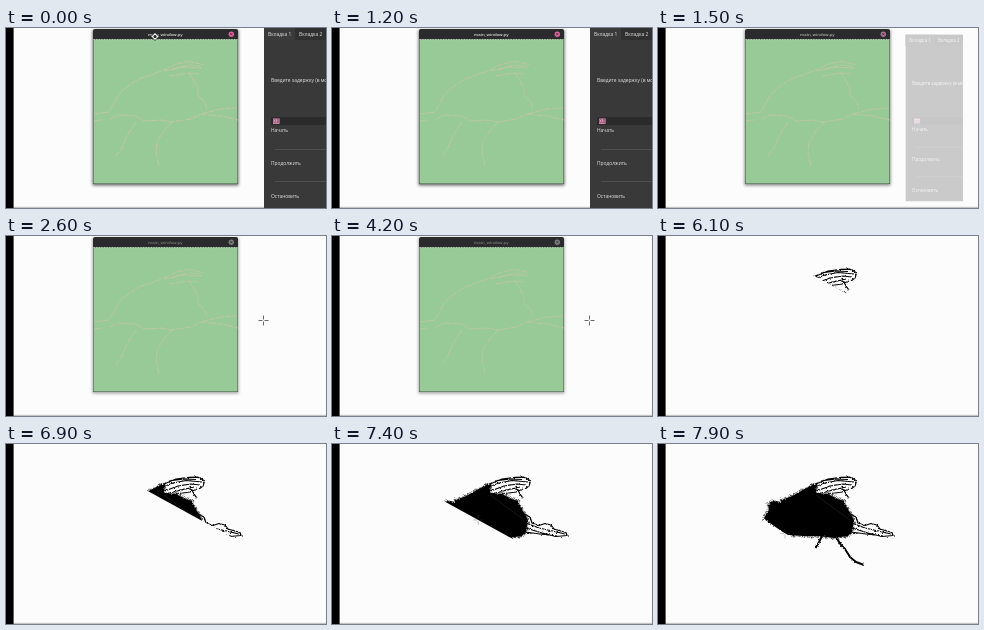
Recreate the animation shown at these times as an HTML page. Size 320 px wide and 180 px high, loop 8 s.

```html
<!DOCTYPE html>
<html lang="ru">
<head>
<meta charset="utf-8">
<title>Drawing a fly</title>
<style>
  html, body { margin: 0; width: 100%; height: 100%; overflow: hidden; background: #fcfcfc; }
  svg { display: block; width: 100vw; height: 100vh; }
  text { font: 4.9px "Open Sans", "Noto Sans", sans-serif; fill: #e4e4e4; }
  .title { font-size: 4.3px; font-weight: 600; text-anchor: middle; }
  .edges { fill: none; stroke: #d9c3a2; stroke-width: .65; stroke-dasharray: 5 1 2 .8 7 1.4; }
  .veins, .legs { fill: none; stroke: #000; stroke-linejoin: round; }
  .veins { stroke-width: 1.25; }
  .legs { stroke-width: 2; }
</style>
</head>
<body>
<svg viewBox="0 0 320 180" preserveAspectRatio="none">
  <defs>
    <filter id="shadow" x="-10%" y="-10%" width="120%" height="120%">
      <feGaussianBlur stdDeviation="1.6"/>
    </filter>
    <filter id="rough" x="-5%" y="-5%" width="110%" height="110%">
      <feTurbulence type="fractalNoise" baseFrequency=".45" numOctaves="2" seed="4"/>
      <feDisplacementMap in="SourceGraphic" scale="2.6" xChannelSelector="R" yChannelSelector="G"/>
    </filter>
    <clipPath id="drawn"><polygon id="front"/></clipPath>
  </defs>

  <rect width="320" height="180" fill="#fcfcfc"/>
  <rect y="178.8" width="320" height="1.2" fill="#c4c4c4"/>
  <rect width="7.6" height="180" fill="#000"/>

  <g id="fly" clip-path="url(#drawn)">
    <g filter="url(#rough)">
      <path id="body" d="M106 75L108 70 111 66 110 61 115 57 122 58 126 55 134 52 143 47 150 44 155 41 159 39 158 49 170 50 178 54 186 57 189 64 193 70 196 76 194 88 190 92 176 94 160 92 145 92 129 91Z"/>
      <path id="hairs" stroke="#000" stroke-width=".7"/>
      <path class="veins" d="M144 47L158 40 170 35 183 33.4 192 33.2 198.5 36.8 197 42 193 45M152 45L167 39 180 36.5 196 38M156 48L172 42 185 40 194 41M160 50L175 46 188 43M170 50L184 48 191 45M184 42L188 50 191 54M163 37L178 35 190 35.5"/>
      <path class="veins" d="M190 69L198 73 200 79 207 81.5 213 79.5 219 81 222 85 234 88.5 235 91.5 224 92.5 210 89 194 84M194 79L207 84 220 87 233 90M193 88L208 90 225 92"/>
      <path class="legs" d="M164 92L161 98 157.5 104M178 93L183 101 187 105 192 113 198 118 206 121"/>
    </g>
    <path d="M158 51L192 76" stroke="#444" stroke-width=".35"/>
  </g>

  <g id="panel">
    <rect x="258" width="62" height="180" fill="#393939"/>
    <rect x="258" width="62" height="12" fill="#303030"/>
    <rect x="258" width="31" height="12" fill="#3b3b3b"/>
    <rect x="265" y="89" width="55" height="8" fill="#2b2b2b"/>
    <rect x="267" y="90.5" width="6.6" height="5.4" fill="#e08bb6"/>
    <path d="M269 121.5H320M269 153.5H320" stroke="#555" stroke-width=".8"/>
    <text x="262" y="8">Вкладка 1</text>
    <text x="293" y="8">Вкладка 2</text>
    <text x="265" y="54">Введите задержку (в мс)</text>
    <text x="267.2" y="95" style="font-size:4.4px;fill:#333">0.0</text>
    <text x="265" y="104">Начать</text>
    <text x="265" y="137">Продолжить</text>
    <text x="265" y="170">Остановить</text>
  </g>

  <g id="window">
    <rect id="shade" x="86.5" y="2" width="146" height="155.5" fill="#000" filter="url(#shadow)"/>
    <path d="M87 156V3Q87 1 89 1H230Q232 1 232 3V156Z" fill="#2b2b2d"/>
    <rect x="87.4" y="11.4" width="144.2" height="144.2" fill="#98ca98"/>
    <path d="M87.5 11.6H231.5" stroke="#d8e8d4" stroke-width=".8" stroke-dasharray="1.4 1.2"/>
    <text id="title" class="title" x="159.3" y="7.7">main_window.py</text>
    <circle id="close" cx="225.3" cy="6.2" r="2.7"/>
    <path d="M224.2 5.1L226.4 7.3M226.4 5.1L224.2 7.3" stroke="#2b2b2d" stroke-width=".7"/>
    <g id="edges" class="edges">
      <path d="M88 86L103 84 108 75 113 66 122 58 133 51 147 46 158 42 170 36 183 33.5 197 36.5M159 43L175 39 196 40M164 48L182 45 192 46M166 42L182 37 194 38M183 45L187 51 192 60 192 68 199 74 201 81"/>
      <path d="M88 93L96 92M104 91L112 87 130 88 138 93 155 92 165 94 185 91 195 86 215 81 231 80M195 86L215 88 232 92"/>
      <path d="M130 94L121 108 116 120 110 128M166 94L157 104 151 114 150 125 153 138"/>
    </g>
  </g>

  <g id="pointer">
    <path d="M0 -4L4 0 0 4 -4 0Z" fill="#fff" stroke="#111" stroke-width=".8"/>
    <circle r="1.6" fill="#222"/>
  </g>
  <path id="cross" d="M-5 0H-1M1 0H5M0 -5V-1M0 1V5" stroke="#444" stroke-width=".8"/>
</svg>
<script>
const $ = id => document.getElementById(id);
const LOOP = 8000, STEP = 100, SLOPE = .55;

// Linear track through [time, value] pairs
function track(t, ...keys) {
  if (t <= keys[0][0]) return keys[0][1];
  for (let i = 1; i < keys.length; i++) {
    const [a, from] = keys[i - 1], [b, to] = keys[i];
    if (t <= b) return from + (to - from) * (t - a) / (b - a);
  }
  return keys[keys.length - 1][1];
}

const show = (id, on) => $(id).setAttribute('visibility', on ? 'visible' : 'hidden');
const fade = (id, value) => $(id).setAttribute('opacity', value);
const place = (id, x, y) => $(id).setAttribute('transform', `translate(${x} ${y})`);
const mix = (a, b, k) => `rgb(${a.map((v, i) => Math.round(v + (b[i] - v) * k))})`;

function growHairs() {
  let seed = 7, d = '';
  const random = () => (seed = seed * 16807 % 2147483647) / 2147483647;
  const body = $('body'), length = body.getTotalLength();
  for (let s = 0; s < length * .86; s += 1.6) {
    const p = body.getPointAtLength(s);
    const angle = Math.atan2(p.y - 70, p.x - 152) + random() - .5;
    const reach = .8 + random() * 1.8;
    d += `M${p.x} ${p.y}l${Math.cos(angle) * reach} ${Math.sin(angle) * reach}`;
  }
  $('hairs').setAttribute('d', d);
}

function draw(t) {
  const blur = track(t, [1300, 0], [1700, 1]);
  show('window', t < 5200);
  $('title').style.fill = mix([228, 228, 228], [125, 125, 125], blur);
  $('close').setAttribute('fill', mix([224, 100, 160], [125, 125, 125], blur));
  fade('shade', .6 - .25 * blur);
  fade('edges', t < 400 ? 1 : t < 4200 ? .88 : .8);

  const gone = track(t, [1200, 0], [1600, 1]);
  fade('panel', 1 - gone);
  $('panel').setAttribute('transform', `translate(${gone * 12} ${gone * 9}) scale(${1 - gone * .1})`);

  show('pointer', t < 800);
  place('pointer', track(t, [0, 149], [300, 73], [800, 280]), track(t, [0, 8.5], [300, 50], [800, 104]));

  // The fly appears behind a slanted front moving down and left
  const front = track(t, [5200, -71.6], [5700, -55], [5900, -52], [6200, -43], [6400, -42],
    [6900, -31], [7200, -14], [7900, 19.5]);
  show('fly', t >= 5200);
  $('front').setAttribute('points', `0,${front} 320,${front + 320 * SLOPE} 320,-200 0,-200`);

  show('cross', (t >= 2100 && t < 5700) || t >= 7300);
  fade('cross', t >= 7300 ? .4 : 1);
  if (t < 5200) {
    const k = track(t, [2100, 0], [2600, 1]), eased = k * (2 - k);
    place('cross', 123 + 134.5 * eased, 175 - 90.5 * eased);
  } else {
    const x = t < 7300 ? track(t, [5200, 198.5], [5700, 186]) : track(t, [7300, 150], [7900, 127]);
    place('cross', x, x * SLOPE + front - (t < 7300 ? 1 : 0));
  }
}

growHairs();
const start = performance.now();
function tick() {
  const t = (performance.now() - start) % LOOP;
  draw(Math.floor(t / STEP) * STEP);
  requestAnimationFrame(tick);
}
tick();
</script>
</body>
</html>
```
